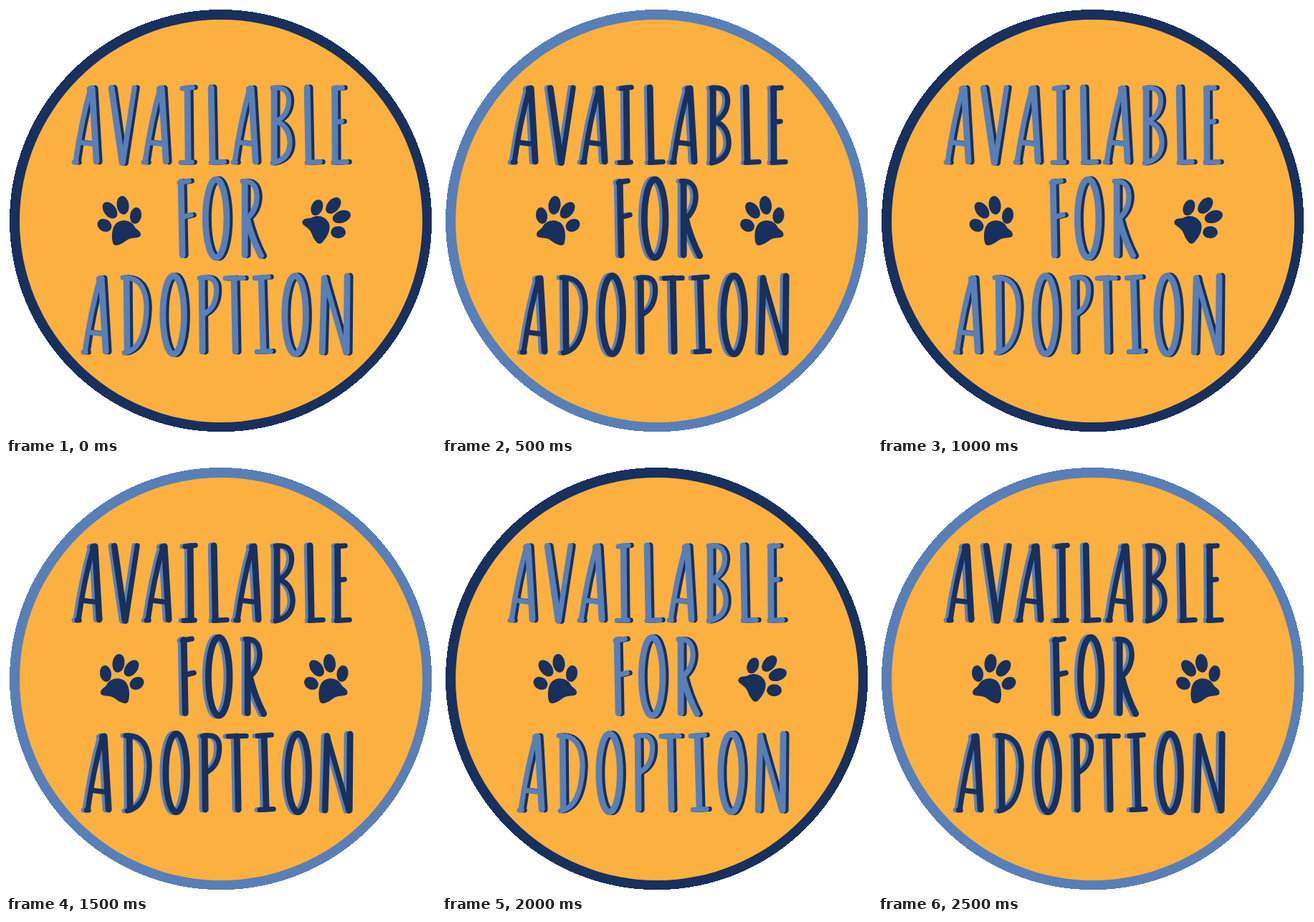
Recreate the animation shown at these times as an HTML page. Size 600 by 600 pixels, loop 3 s.

```html
<!DOCTYPE html>
<html lang="en">
<head>
<meta charset="utf-8">
<title>Available for adoption</title>
<style>
  html, body { margin: 0; width: 100%; height: 100%; overflow: hidden; background: #fff; }
  svg { display: block; width: 100vw; height: 100vh; }
  .letters { fill: none; stroke-linecap: round; stroke-linejoin: round; }
</style>
</head>
<body>
<svg id="badge" viewBox="0 0 600 600" role="img" aria-label="Available for adoption"></svg>
<script>
const NAVY = '#18305e', BLUE = '#587fb8', GOLD = '#fcb040';
const STEP = 500;

// Hand lettering: [heavy strokes, light strokes], cap height about 112
const GLYPHS = {
  A: ['M26 6L29 5L35 107', 'M27 5Q14 50 6 107M4 108L7 108M10 80L34 83'],
  B: ['M6 5L6 107', 'M4 4.5Q26 1 26.5 22Q26 42 9 51Q28 58 28 82Q27 104 4 109'],
  D: ['M9 5L10 107', 'M4 4Q36 2 37 46Q35 104 6 109'],
  E: ['M6.5 5L7 107', 'M5 5L17 4M8 52L16 51M5 108.5L23 107.5'],
  F: ['M7 5L9 107', 'M5 6L18 3.5M9 54L21 51'],
  I: ['M12 5L13 107', 'M5 5L19 3.5M3 108.5L18 108'],
  J: ['M13 5L16 106', 'M4 4.5L23 3M7 107.5L26 106.5'],
  L: ['M5 4L7 106', 'M5 108.5L23 107.5'],
  N: ['M8 5L5 108M40 2L39 108', 'M8 4L38 109'],
  O: ['M0 1.5A14.8 54.5 0 0 0 0 110.5A14.8 54.5 0 0 0 0 1.5', ''],
  P: ['M7 5L8 107', 'M4 5Q28 -1 27.5 22Q27 46 10 55'],
  R: ['M6 5L6 107M9 56Q16 84 28.5 108', 'M3 4Q23 2 23 27Q22 46 8 57'],
  T: ['M16 5L18 107', 'M4 5L29 4.5'],
  V: ['M5 4.5L20 108.5', 'M37 4L21 109']
};

// J stands for the wider capital I in the last line
const LINES = [
  { y: 110, text: 'AVAILABLE', x: [95, 146, 192, 245, 285, 317, 372, 419, 456] },
  { y: 240.5, text: 'FOR', x: [241, 297, 331] },
  { y: 375, text: 'ADOPTJON', x: [108, 163, 237.5, 270, 306, 347, 407.5, 440] }
];

const TOES = [[137.5, 306, 10.5, 8.5, 32], [145, 285, 8.5, 13, -38], [163, 278, 8.5, 13, -8], [181, 292.5, 8, 11.5, 10]];
const PAD = 'M149 330C147 322 147 306 157 301C165 297 175 300 179 307C181 312 188 313 188 319' +
            'C188 324 181 323 176 324C168 325 165 331 158 333C153 335 150 334 149 330Z';

const flip = 'translate(320 0) scale(-1 1)';
const tilt = 'translate(464 316) rotate(32) translate(-183 -306) ';

const paw = transform => `<g fill="${NAVY}" transform="${transform}">` +
  TOES.map(([x, y, rx, ry, a]) =>
    `<ellipse rx="${rx}" ry="${ry}" transform="translate(${x} ${y}) rotate(${a})"/>`).join('') +
  `<path d="${PAD}"/></g>`;

const glyph = (ch, x, y) => {
  const [heavy, light] = GLYPHS[ch];
  return `<g transform="translate(${x} ${y})">` +
    `<path d="${heavy}" stroke-width="8.8"/><path d="${light}" stroke-width="7.2"/></g>`;
};

const letters = LINES.map(({ y, text, x }) =>
  [...text].map((ch, i) => glyph(ch, x[i], y)).join('')).join('');

const layer = color =>
  `<g class="letters" stroke="${color}" transform="translate(${color === BLUE ? -3.9 : 0.2} 0)">${letters}</g>`;

const pose = (ring, back, front, paws) => `<g class="pose">
  <circle cx="299.6" cy="299.6" r="294.6" fill="${ring}" shape-rendering="crispEdges"/>
  <circle cx="300" cy="300" r="281" fill="${GOLD}"/>
  ${layer(back)}${layer(front)}${paws.map(paw).join('')}</g>`;

const badge = document.getElementById('badge');
badge.innerHTML =
  pose(NAVY, NAVY, BLUE, ['', tilt + flip]) +
  pose(BLUE, BLUE, NAVY, [flip, 'translate(288.5 0)']);

badge.querySelectorAll('.pose').forEach((el, i) => {
  const on = i === 0 ? [1, 0] : [0, 1];
  el.animate([
    { opacity: on[0], offset: 0, easing: 'step-end' },
    { opacity: on[1], offset: 0.5, easing: 'step-end' },
    { opacity: on[1], offset: 1 }
  ], { duration: 2 * STEP, iterations: Infinity });
});
</script>
</body>
</html>
```
